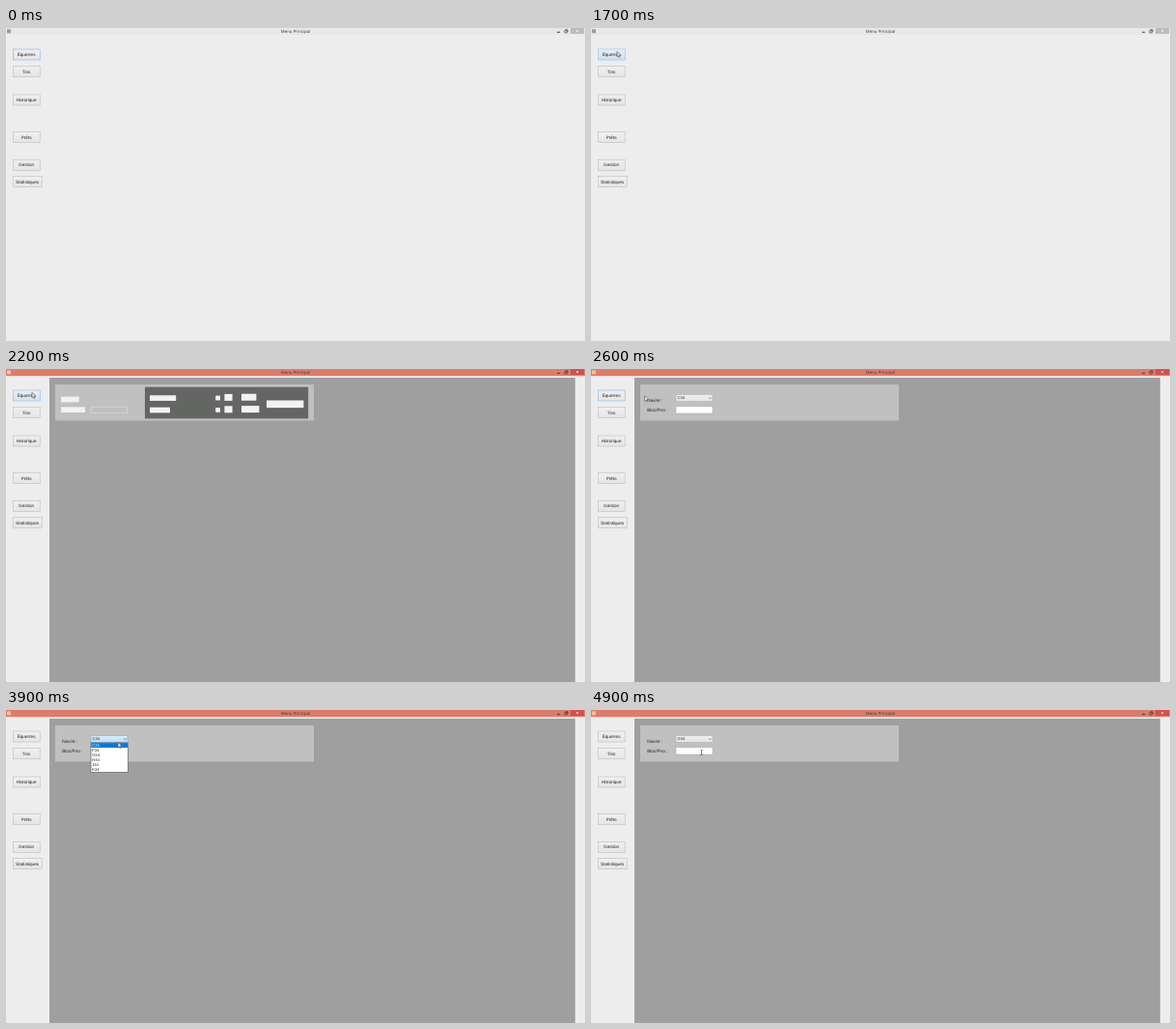
An HTML page that plays this animation: 600x324 px, repeating every 5 s.

```html
<!DOCTYPE html>
<html lang="fr">
<head>
<meta charset="utf-8">
<title>Menu Principal</title>
<style>
  html, body { margin: 0; width: 100%; height: 100%; overflow: hidden; background: #eeedee; }
  svg { display: block; width: 600px; height: 324px; }
  text { font: 4.65px "Liberation Sans", Arial, sans-serif; fill: #222; text-rendering: geometricPrecision; }
  .mid { text-anchor: middle; }
  .title { font: 4.35px "Open Sans", "Noto Sans", sans-serif; fill: #3c3533; }
  .item { font-size: 4.1px; }
</style>
</head>
<body>
<svg id="stage" viewBox="0 0 600 324">
  <defs>
    <linearGradient id="plain" x2="0" y2="1"><stop stop-color="#f0f0f0"/><stop offset="1" stop-color="#e5e5e5"/></linearGradient>
    <linearGradient id="hot" x2="0" y2="1"><stop stop-color="#dceefb"/><stop offset="1" stop-color="#bcdcf5"/></linearGradient>
  </defs>
</svg>
<script>
const stage = document.getElementById('stage');
const LOOP = 5000, STEP = 100, ROW = 4.98;

function add(tag, attrs, parent = stage, content = '') {
  const el = document.createElementNS('http://www.w3.org/2000/svg', tag);
  set(el, attrs);
  el.textContent = content;
  return parent.appendChild(el);
}
function set(el, attrs) {
  for (const key in attrs) el.setAttribute(key, attrs[key]);
}
const group = parent => add('g', {}, parent);
const box = (x, y, width, height, fill, parent, stroke = 'none') =>
  add('rect', { x, y, width, height, fill, stroke, 'stroke-width': 0.6 }, parent);
const line = (d, stroke, parent, fill = 'none') =>
  add('path', { d, stroke, fill, 'stroke-width': 0.6 }, parent);
const label = (x, y, content, parent, cls = '') => add('text', { x, y, class: cls }, parent, content);
const show = (el, on) => el.style.display = on ? '' : 'none';
const clamp = (v, lo = 0, hi = 1) => Math.max(lo, Math.min(hi, v));

// Window frame
const bar = box(0, 0, 600, 7.2);
const icon = box(1, 1.3, 4, 4);
label(300, 5.3, 'Menu Principal', stage, 'mid title');
line('M571.2 4.2h2.6v.4h-2.6z', '#333');
line('M578.9 2.6h2.4v2.4h-2.4zM579.8 2.4v-.7h2.3v2.3h-.7', '#333');
const closeBox = box(585, 0, 14, 6);
line('M590.9 1.9l2.3 2.3m0-2.3l-2.3 2.3', '#fff');

// Side menu
const menu = { 'Équerres': 27.5, Tins: 45, Historique: 74.5, 'Prêts': 113, Gestion: 141.8, Statistiques: 159 };
const [first] = Object.entries(menu).map(([name, y]) => {
  const wide = name.length > 10 ? 2 : 0;
  const face = box(7.4, y - 5.5, 27.8 + wide, 11, 'url(#plain)', stage, '#bdbdbd');
  const glow = box(7.4, y - 5.5, 27.8 + wide, 11, 'url(#hot)');
  set(glow, { opacity: 0 });
  label(21.1 + wide / 2, y + 1.6, name, stage, 'mid');
  return { face, glow };
});

// Work area
const work = group();
box(45, 9, 544.8, 315, '#9f9f9f', work);
box(51, 16, 268, 37.4, '#c0c0c0', work);

// Unpainted controls: two rows of white blocks
const blank = group(work);
box(143.7, 18.2, 170, 33.6, '#646664', blank, '#c8c8c8');
box(88.3, 39.2, 37.4, 6.3, '#c0c0c0', blank, '#dcdcdc');
const block = (x, y, w, h) => box(x, y - h / 2, w, h, '#f2f2f2', blank);
for (const lower of [0, 1]) {
  const y = 29.8 + 12.4 * lower;
  block(57.2, y + 1.7 * (1 - lower), 18.4 + 6.4 * lower, 5.7);
  block(149, y + 0.3, 27.2 - 6.2 * lower, 5.7);
  block(217.2, y + 0.2, 4.8, 4.8);
  block(226.4, y - 0.4, 8.2, 7);
  block(244, y - 0.6, 15.4 + 3 * lower, 7);
}
block(270, 36.3, 38.4, 7.6);

const form = group(work);
label(58.2, 33.6, 'Navire :', form);
label(58.2, 44.2, 'Bloc/Pno :', form);
const combo = box(88, 26.3, 38, 7.4, '', form);
const choice = label(89.6, 31.4, '', form, 'item');
line('M122.1 29.5l1.3 1.3 1.3-1.3', '#444', form);
box(88, 38.8, 38, 7.2, '#fff', form, '#b0b0b0');

const list = group(work);
box(88, 34, 38.3, 30.4, '#fff', list, '#555');
const band = box(88.3, 34, 37.7, 4.9, '#0a78d6', list);
const rows = [...'CFGHJK'].map((c, i) => label(89.2, 38 + i * ROW, c + '34', list, 'item'));

// Pointers
const arrow = line('M0 0V5.5L1.3 4.4 2.1 6.3 3 5.9 2.2 4.1H3.9Z', '#484848', stage, '#f6f6f6');
const beam = line('M-1-2.5h.7l.3.3.3-.3h.7M0-2.2v4.4M-1 2.5h.7l.3-.3.3.3h.7', '#222');

// Straight moves; the pointer rests between them
const moves = [
  { from: 100, to: 1200, x: 93.2, y: 81.2 },
  { from: 1200, to: 1700, x: 27, y: 24.3 },
  { from: 2400, to: 3000, x: 112.5, y: 34.2 },
  { from: 3000, to: 3200, x: 116.2, y: 30.6 },
  { from: 3800, to: 4400, x: 115.3, y: 47 },
  { from: 4600, to: 4900, x: 114.6, y: 44 },
];
function pointerAt(t) {
  let x = 462, y = 322;
  for (const m of moves) {
    const k = clamp((t - m.from) / (m.to - m.from));
    x += (m.x - x) * k;
    y += (m.y - y) * k;
  }
  return { x, y };
}

function draw(t) {
  const active = t >= 2000, typing = t >= 4700;
  set(bar, { fill: active ? '#dc7c6a' : '#e8e8e8' });
  set(icon, { fill: active ? '#e9c3a4' : '#a39a86' });
  set(closeBox, { fill: active ? '#d2504e' : '#bcbcbc' });

  set(first.face, { stroke: t < 3300 ? '#78b4ea' : '#bdbdbd' });
  set(first.glow, { opacity: clamp((t - 1600) / 200) * clamp((2250 - t) / 150) });

  show(work, t >= 2200);
  show(blank, t < 2300);
  show(form, t >= 2300);
  const hot = t >= 3100 && !typing;
  set(combo, { fill: hot ? 'url(#hot)' : 'url(#plain)', stroke: hot ? '#70b1e6' : '#adadad' });
  choice.textContent = t >= 4600 ? 'G34' : 'C34';

  const { x, y } = pointerAt(t);
  show(list, t >= 3400 && t < 4600);
  const picked = clamp(Math.floor((y - 34) / ROW), 0, rows.length - 1);
  set(band, { y: 34.1 + picked * ROW });
  rows.forEach((row, i) => row.style.fill = i === picked ? '#fff' : '');

  show(arrow, t >= 100 && !typing);
  show(beam, typing);
  set(typing ? beam : arrow, { transform: `translate(${x} ${y})` });
}

const start = performance.now();
function tick() {
  const t = (performance.now() - start) % LOOP;
  draw(Math.floor(t / STEP) * STEP);
  requestAnimationFrame(tick);
}
tick();
</script>
</body>
</html>
```
